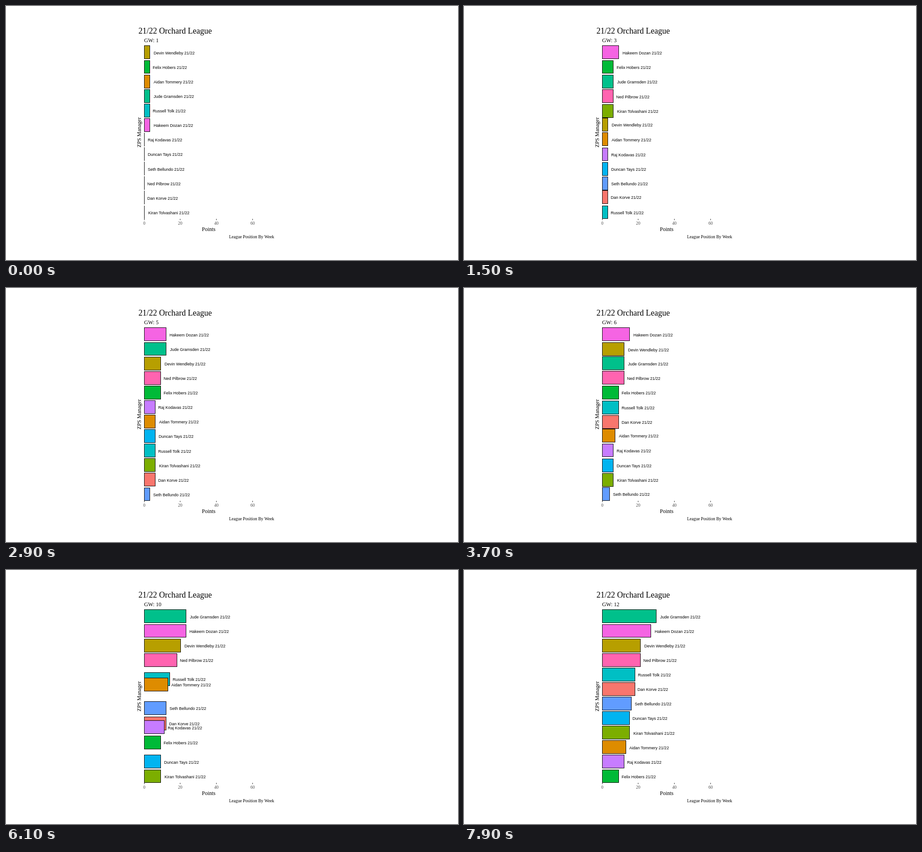
Animation of 998x561 px, one loop 8000 ms. Source, as an HTML page:

```html
<!DOCTYPE html>
<html lang="en">
<head>
<meta charset="utf-8">
<title>League position by week</title>
<style>
  html, body { margin: 0; width: 100%; height: 100%; overflow: hidden; background: #fff; }
  svg { display: block; }
  text { font-family: "Liberation Serif", "Times New Roman", serif; font-size: 12px; }
  .title { font-size: 18px; }
  .small { font-size: 9.6px; }
  .axis { fill: #4d4d4d; }
  .name { font-family: "Liberation Sans", Arial, sans-serif; font-size: 9px; }
  .bar { stroke: #000; stroke-width: 1; }
  .tick { stroke: #333; stroke-width: 1; }
</style>
</head>
<body>
<svg id="stage" width="998" height="561" viewBox="0 0 998 561">
  <text class="title" x="292.5" y="61">21/22 Orchard League</text>
  <text id="week" x="305" y="80"></text>
  <text text-anchor="middle" transform="translate(298 279) rotate(-90)">ZPS Manager</text>
  <text text-anchor="middle" x="447.5" y="497">Points</text>
  <text class="small" text-anchor="end" x="592" y="513">League Position By Week</text>
  <g id="axis"></g>
  <g id="bars"></g>
  <g id="names"></g>
</svg>
<script>
const STEP = 100, STEPS = 80;
const X0 = 305, PER_POINT = 3.98;
const TOP = 87.45, PITCH = 32.1, BAR = 28.9, BASELINE = 19.25;

const managers = {
  B: ["Dan Korve", "#f8766d"],
  D: ["Aidan Tommery", "#de8c00"],
  G: ["Devin Wendleby", "#b79f00"],
  H: ["Kiran Tolvashani", "#7cae00"],
  L: ["Felix Hobers", "#00ba38"],
  U: ["Jude Gramsden", "#00c08b"],
  M: ["Russell Tolk", "#00bfc4"],
  N: ["Duncan Tays", "#00b4f0"],
  R: ["Seth Bellundo", "#619cff"],
  S: ["Raj Kodavas", "#c77cff"],
  W: ["Hakeem Dozan", "#f564e3"],
  T: ["Ned Pilbrow", "#ff64b0"]
};

// first step of the week, table order, winners (3 points), draws (1 point)
const weeks = [
  [0, "GLDUMWSNRTBH", "GLDUMW", ""],
  [7, "UWGLSDMTBHNR", "UWSTBH", ""],
  [14, "WLUTHGDSNRBM", "WLTHNR", ""],
  [21, "WLUGDTBHSNRM", "WLUGDB", ""],
  [29, "WUGTLSDNMHBR", "UGTMSN", ""],
  [36, "WGUTLMBDSNHR", "WGTMB", "DR"],
  [43, "WUTGDLSMBRNH", "WUTDSR", ""],
  [50, "UWGTDMBRLSNH", "UGDMBR", ""],
  [57, "UWGTDMBRLSNH", "UWGTNH", ""],
  [64, "UWGTMDRSBLNH", "UWGMRS", ""],
  [71, "UWGTRMBDSNHL", "UWBNHR", ""],
  [79, "UWGTMBRNHDSL", "UTMBNH", ""]
];

const byId = id => document.getElementById(id);
const lerp = (a, b, p) => a + (b - a) * p;
const cubicInOut = p => p < 0.5 ? 4 * p ** 3 : 1 - 4 * (1 - p) ** 3;

function add(parent, tag, attrs, text = "") {
  const el = document.createElementNS("http://www.w3.org/2000/svg", tag);
  set(el, attrs);
  el.textContent = text;
  return parent.appendChild(el);
}

function set(el, attrs) {
  for (const key in attrs) el.setAttribute(key, attrs[key]);
}

for (const value of [0, 20, 40, 60]) {
  const x = Math.floor(X0 + value * PER_POINT + 0.3) + 0.5;
  add(byId("axis"), "line", { class: "tick", x1: x, x2: x, y1: 470, y2: 473 });
  add(byId("axis"), "text", { class: "small axis", "text-anchor": "middle", x, y: 483 }, value);
}

const rows = Object.entries(managers).map(([key, [name, fill]]) => {
  let total = 0;
  const points = weeks.map(([, , won, drawn]) =>
    total += won.includes(key) ? 3 : drawn.includes(key) ? 1 : 0);
  const label = add(byId("names"), "text", { class: "name" }, name + " 21/22");
  return {
    points,
    ranks: weeks.map(week => week[1].indexOf(key)),
    bar: add(byId("bars"), "rect", { class: "bar", fill }),
    label,
    gap: label.getComputedTextLength() * 0.1
  };
});

function draw(step) {
  let from = weeks.length - 1;
  while (weeks[from][0] > step) from--;
  const to = Math.min(from + 1, weeks.length - 1);
  const length = weeks[to][0] - weeks[from][0] || 1;
  const part = (step - weeks[from][0]) / length;
  const p = cubicInOut(part);

  byId("week").textContent = "GW: " + ((part > 0.5 ? to : from) + 1);

  for (const row of rows) {
    row.value = lerp(row.points[from], row.points[to], p);
    const y = TOP + PITCH * lerp(row.ranks[from], row.ranks[to], p);
    const end = X0 + row.value * PER_POINT;
    const top = Math.round(y);
    set(row.bar, {
      x: X0 + 0.5,
      y: top + 0.5,
      width: Math.max(0.01, Math.round(end) - X0),
      height: Math.round(y + BAR) - top
    });
    set(row.label, { x: Math.round(end + row.gap), y: Math.round(y + BASELINE) });
  }

  // shorter bars lie in front
  const order = [...rows].sort((a, b) => b.value - a.value || a.ranks[from] - b.ranks[from]);
  byId("bars").append(...order.map(row => row.bar));
}

const start = performance.now();
let shown = -1;

function tick() {
  const step = Math.floor((performance.now() - start) / STEP) % STEPS;
  if (step !== shown) draw(shown = step);
  requestAnimationFrame(tick);
}
tick();
</script>
</body>
</html>
```
